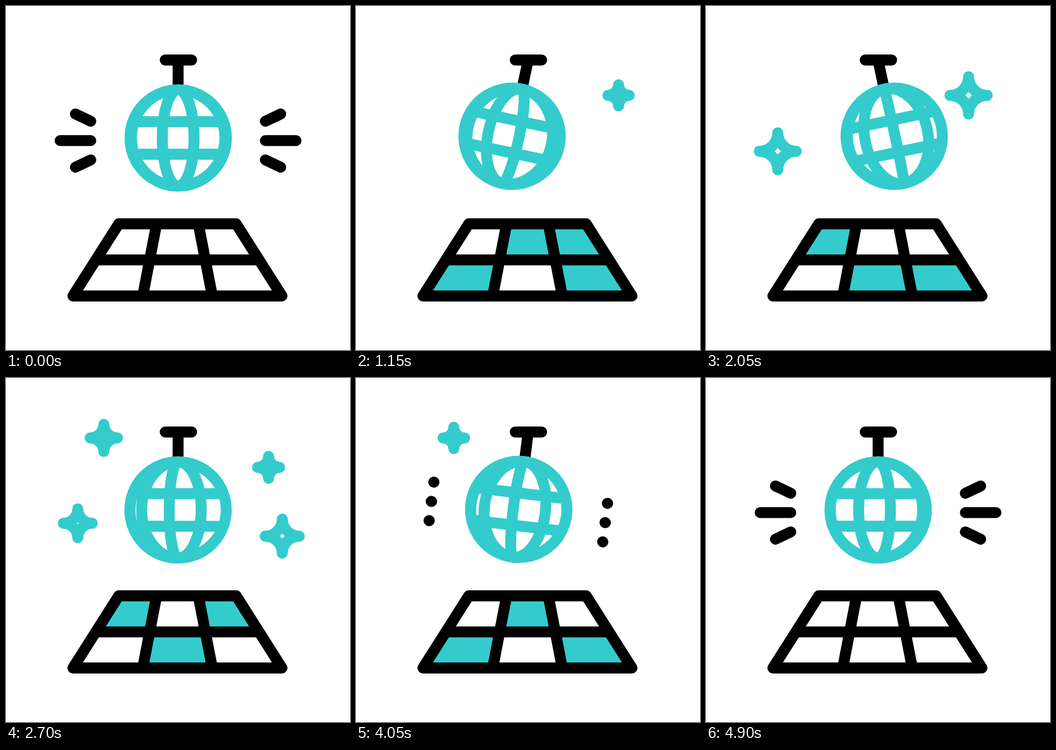
These frames come from a looping animation (640 px wide and 640 px high, 4.95 s). An HTML page:

```html
<!DOCTYPE html>
<html lang="en">
<head>
<meta charset="utf-8">
<title>Disco ball</title>
<style>
  html, body { margin: 0; width: 100%; height: 100%; overflow: hidden; background: #fff; }
  svg { display: block; width: 100vw; height: 100vh; }
  .line { fill: none; stroke: #000; stroke-width: 20.4; stroke-linecap: round; stroke-linejoin: round; }
  .teal { stroke: #34cbcc; }
  .butt { stroke-linecap: butt; }
  #tiles path { fill: #34cbcc; }
</style>
</head>
<body>
<svg viewBox="0 0 640 640">
  <g id="tiles"></g>
  <path id="floor" class="line"/>
  <g id="swing">
    <path class="line butt" d="M320.2 101V156"/>
    <g transform="translate(320.3 245.5)">
      <circle class="line teal" r="89.6" style="fill:#fff"/>
      <path class="line teal butt" d="M-85 -30.3H85M-85 30.3H85"/>
      <path id="meridians" class="line teal butt"/>
    </g>
    <path id="rays" class="line"/>
  </g>
  <path class="line" d="M296.3 100.5H345.3"/>
  <g id="stars"></g>
</svg>
<script>
const LOOP = 4950, STEP = 50;
const { PI, sin, cos, abs, sign, max, min } = Math;
const $ = id => document.getElementById(id);
const ease = v => (1 - cos(PI * min(1, max(0, v)))) / 2;

function addPath(parent, attrs) {
  const el = document.createElementNS('http://www.w3.org/2000/svg', 'path');
  for (const name in attrs) el.setAttribute(name, attrs[name]);
  $(parent).append(el);
  return el;
}

// Floor: grid lines run from the back edge to the front edge
const backY = 405.2, frontY = 539.5;
const back = [209.8, 280.2, 357.8, 428.2];
const front = [124.5, 254.4, 383.8, 513.4];
const floorPoint = (col, depth) =>
  `${back[col] + (front[col] - back[col]) * depth} ${backY + (frontY - backY) * depth}`;
const quad = (c0, c1, d0, d1) =>
  `M${floorPoint(c0, d0)}L${floorPoint(c1, d0)}L${floorPoint(c1, d1)}L${floorPoint(c0, d1)}Z`;

const tiles = [];
for (let row = 0; row < 2; row++) {
  for (let col = 0; col < 3; col++) {
    tiles.push(addPath('tiles', { d: quad(col, col + 1, row / 2, (row + 1) / 2) }));
  }
}
$('floor').setAttribute('d', quad(0, 3, 0, 0.5) + quad(0, 3, 0, 1) + quad(1, 2, 0, 1));

// Tile patterns, back row first
const lights = [[0, '000000'], [800, '011101'], [1400, '100011'], [2500, '101010'], [3350, '010101'], [4200, '000000']];

// Turning points of the pendulum: [time, degrees]
const sway = [[0, 0], [1050, 12.8], [1910, -12.4], [3500, 12.8], [4665, 0], [LOOP, 0]];

// x, y, time of full size
const stars = [[488.5, 166.3, 1940], [133.5, 270.3, 2190], [514, 294.2, 3010], [182, 111.5, 3270]]
  .map(([x, y, peak]) => ({
    peak,
    el: addPath('stars', { class: 'line teal', transform: `translate(${x} ${y})` })
  }));

function swayAt(t) {
  const i = sway.findIndex(k => t < k[0]);
  const [t0, a] = sway[i - 1], [t1, b] = sway[i];
  return a + (b - a) * ease((t - t0) / (t1 - t0));
}

// Ten evenly spaced meridians pass per loop, slower at its ends
function meridians(t) {
  const u = t / LOOP;
  const spin = 10 * u - 0.4 * sin(PI * u) - 0.3 * sin(2 * PI * u) + 0.09 * sin(8 * PI * u);
  const phase = spin % 1;
  let d = '';
  for (let k = -3; k <= 2; k++) {
    const s = 38.5 * (k + 0.5 + phase);
    // Lines hurry off the right rim; near the rest pose the left ones stay on it too
    const push = s > 0 ? 1 : cos(PI * u) ** 16;
    const lon = s + sign(s) * push * 0.013 * max(0, abs(s) - 20) ** 2;
    if (abs(lon) > 88) continue;
    const rx = 89.6 * sin(lon * PI / 180);
    d += `M0 -89.6A${abs(rx)} 89.6 0 0 ${rx > 0 ? 1 : 0} 0 89.6`;
  }
  return d;
}

function rays(t) {
  if (t >= 550 && t < 4000) return '';
  const grow = t < 550 ? 1 - ease((t - 350) / 200) : ease((t - 4020) / 420);
  let d = '';
  for (const side of [-1, 1]) {
    for (const i of [-1, 0, 1]) {
      const length = i ? 28.4 : 56.8;
      const x = 320.1 + side * 162.5, y = 250.4 + 36 * i;
      d += `M${x} ${y}l${side * length * grow} ${13.5 * i * grow + 0.01}`;
    }
  }
  return d;
}

function star(dt) {
  if (abs(dt) > 890) return '';
  const r = 25.6 + 9.6 * cos(0.0028 * dt);
  const arc = (x, y) => `A${r} ${r} 0 0 0 ${x} ${y}`;
  return `M0 ${-r}${arc(r, 0)}${arc(0, r)}${arc(-r, 0)}${arc(0, -r)}Z`;
}

function draw(t) {
  $('swing').setAttribute('transform', `rotate(${swayAt(t)} 320.2 101)`);
  $('meridians').setAttribute('d', meridians(t));
  $('rays').setAttribute('d', rays(t));
  const lit = lights.filter(l => l[0] <= t).pop()[1];
  tiles.forEach((el, i) => el.setAttribute('opacity', lit[i]));
  for (const s of stars) s.el.setAttribute('d', star(t - s.peak));
}

const start = performance.now();
function tick() {
  const t = (performance.now() - start) % LOOP;
  draw(Math.floor(t / STEP) * STEP);
  requestAnimationFrame(tick);
}
tick();
</script>
</body>
</html>
```
